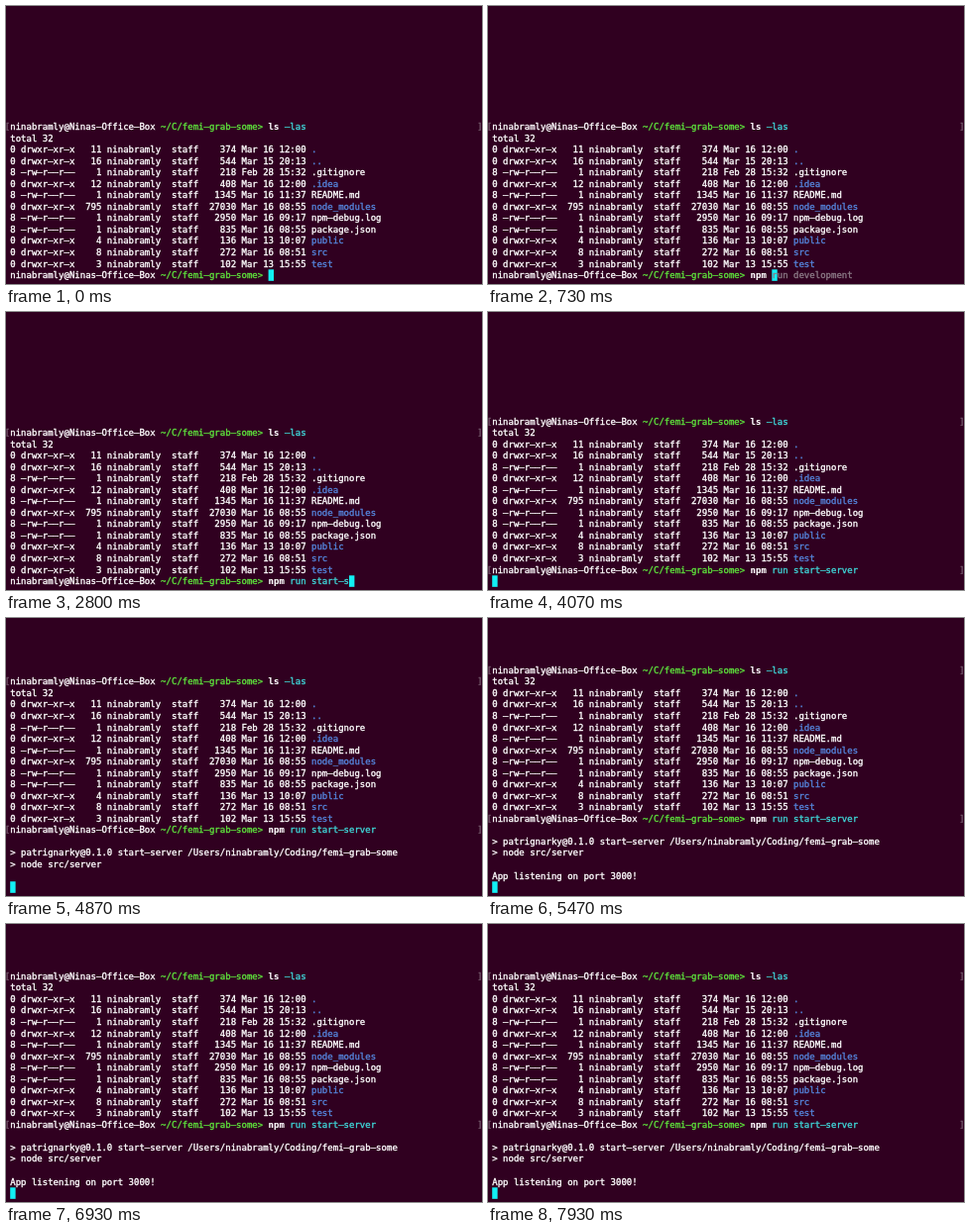
An HTML page with a canvas for the animation above (8 s loop, 480x281 px).

```html
<!DOCTYPE html>
<html lang="en">
<head>
<meta charset="utf-8">
<title>Terminal</title>
<style>
  html, body { margin: 0; width: 100%; height: 100%; overflow: hidden; background: #300020; }
  canvas { display: block; width: 480px; height: 281px; }
</style>
</head>
<body>
<canvas id="screen"></canvas>
<script>
const WIDTH = 480, HEIGHT = 281, LOOP = 8000;
const CELL = 5.425, ROW = 11.54, LEFT = 4.2, LAST_TOP = 266.3, BASELINE = 8.8;
const ZOOM = 10; // draw large and scale down for smooth subpixel glyphs
const COLOR = {
  back: '#300020', text: '#ffffff', green: '#5ee53c', cyan: '#3fd6d8',
  blue: '#5585dc', dim: '#8b7a86', mark: '#75596d', cursor: '#12f0f4'
};
const USER = 'ninabramly', HOST = 'Ninas-Office-Box', FOLDER = 'femi-grab-some';

const canvas = document.getElementById('screen');
const ctx = canvas.getContext('2d');
const ratio = window.devicePixelRatio || 1;
canvas.width = WIDTH * ratio;
canvas.height = HEIGHT * ratio;

const run = (text, color = COLOR.text, bold = false) => ({ text, color, bold });
const plain = text => ({ runs: [run(text)] });
const prompt = (runs, marked) => ({
  marked,
  runs: [run(`${USER}@${HOST} `), run(`~/C/${FOLDER}> `, COLOR.green), ...runs]
});

const entry = (links, size, date, name, isDir) => ({
  runs: [
    run(`${isDir ? '0 drwxr-xr-x' : '8 -rw-r--r--'}${String(links).padStart(5)} ` +
        `${USER}  staff${String(size).padStart(7)} ${date} `),
    run(name, isDir ? COLOR.blue : COLOR.text)
  ]
});

const listing = [
  prompt([run('ls', COLOR.text, true), run(' -las', COLOR.cyan)], true),
  plain('total 32'),
  entry(11, 374, 'Mar 16 12:00', '.', true),
  entry(16, 544, 'Mar 15 20:13', '..', true),
  entry(1, 218, 'Feb 28 15:32', '.gitignore'),
  entry(12, 408, 'Mar 16 12:00', '.idea', true),
  entry(1, 1345, 'Mar 16 11:37', 'README.md'),
  entry(795, 27030, 'Mar 16 08:55', 'node_modules', true),
  entry(1, 2950, 'Mar 16 09:17', 'npm-debug.log'),
  entry(1, 835, 'Mar 16 08:55', 'package.json'),
  entry(4, 136, 'Mar 13 10:07', 'public', true),
  entry(8, 272, 'Mar 16 08:51', 'src', true),
  entry(3, 102, 'Mar 13 15:55', 'test', true)
];

const COMMAND = 'npm run start-server';
const KEY_TIMES = [300, 430, 560, 700, 850, 1000, 1130, 1300, 1770, 1920,
                   2060, 2200, 2340, 2530, 2730, 2870, 3000, 3130, 3240, 3350];
const ENTER = 3600, BANNER = 4530, READY = 5470;

const banner = [
  plain(''),
  plain(`> patrignarky@0.1.0 start-server /Users/${USER}/Coding/${FOLDER}`),
  plain('> node src/server'),
  plain('')
];

function suggestion(count) {
  if (count === 0 || count > 13) return '';
  return (count <= 8 ? 'npm run development' : COMMAND).slice(count);
}

function linesAt(time) {
  const count = KEY_TIMES.filter(key => key <= time).length;
  const typed = COMMAND.slice(0, count);
  const entered = time >= ENTER;
  const command = prompt([
    run(typed.slice(0, 3), COLOR.text, true),
    run(typed.slice(3), COLOR.cyan),
    run(entered ? '' : suggestion(count), COLOR.dim)
  ], entered);
  const lines = [...listing, command];
  if (time >= BANNER) lines.push(...banner);
  if (time >= READY) lines.push(plain('App listening on port 3000!'));
  if (entered) lines.push(plain(''));
  return { lines, cursor: entered ? 0 : 48 + count };
}

function glyphs(text, x, y, color, bold) {
  ctx.save();
  ctx.scale(1 / ZOOM, 1 / ZOOM);
  ctx.font = `${bold ? 'bold ' : ''}${9 * ZOOM}px "DejaVu Sans Mono", monospace`;
  ctx.fillStyle = ctx.strokeStyle = color;
  ctx.lineWidth = (bold ? 0.12 : 0.36) * ZOOM;
  ctx.lineJoin = 'round';
  // the terminal's hyphen is as wide as an en dash
  [...text.replaceAll('-', '–')].forEach((char, i) => {
    if (char === ' ') return;
    const left = (x + i * CELL) * ZOOM;
    ctx.fillText(char, left, y * ZOOM);
    ctx.strokeText(char, left, y * ZOOM);
  });
  ctx.restore();
}

function drawLine(line, top) {
  const y = top + BASELINE;
  let x = LEFT;
  for (const { text, color, bold } of line.runs) {
    glyphs(text, x, y, color, bold);
    x += text.length * CELL;
  }
  if (line.marked) {
    glyphs('[', -1.3, y, COLOR.mark);
    glyphs(']', 475.3, y, COLOR.mark);
  }
}

function draw(time) {
  const { lines, cursor } = linesAt(time);
  ctx.setTransform(ratio, 0, 0, ratio, 0, 0);
  ctx.fillStyle = COLOR.back;
  ctx.fillRect(0, 0, WIDTH, HEIGHT);
  ctx.fillStyle = COLOR.cursor;
  ctx.fillRect(LEFT + cursor * CELL, LAST_TOP, CELL, ROW);
  lines.forEach((line, i) => drawLine(line, LAST_TOP - (lines.length - 1 - i) * ROW));
}

const start = performance.now();
function tick() {
  draw((performance.now() - start) % LOOP);
  requestAnimationFrame(tick);
}
tick();
</script>
</body>
</html>
```
